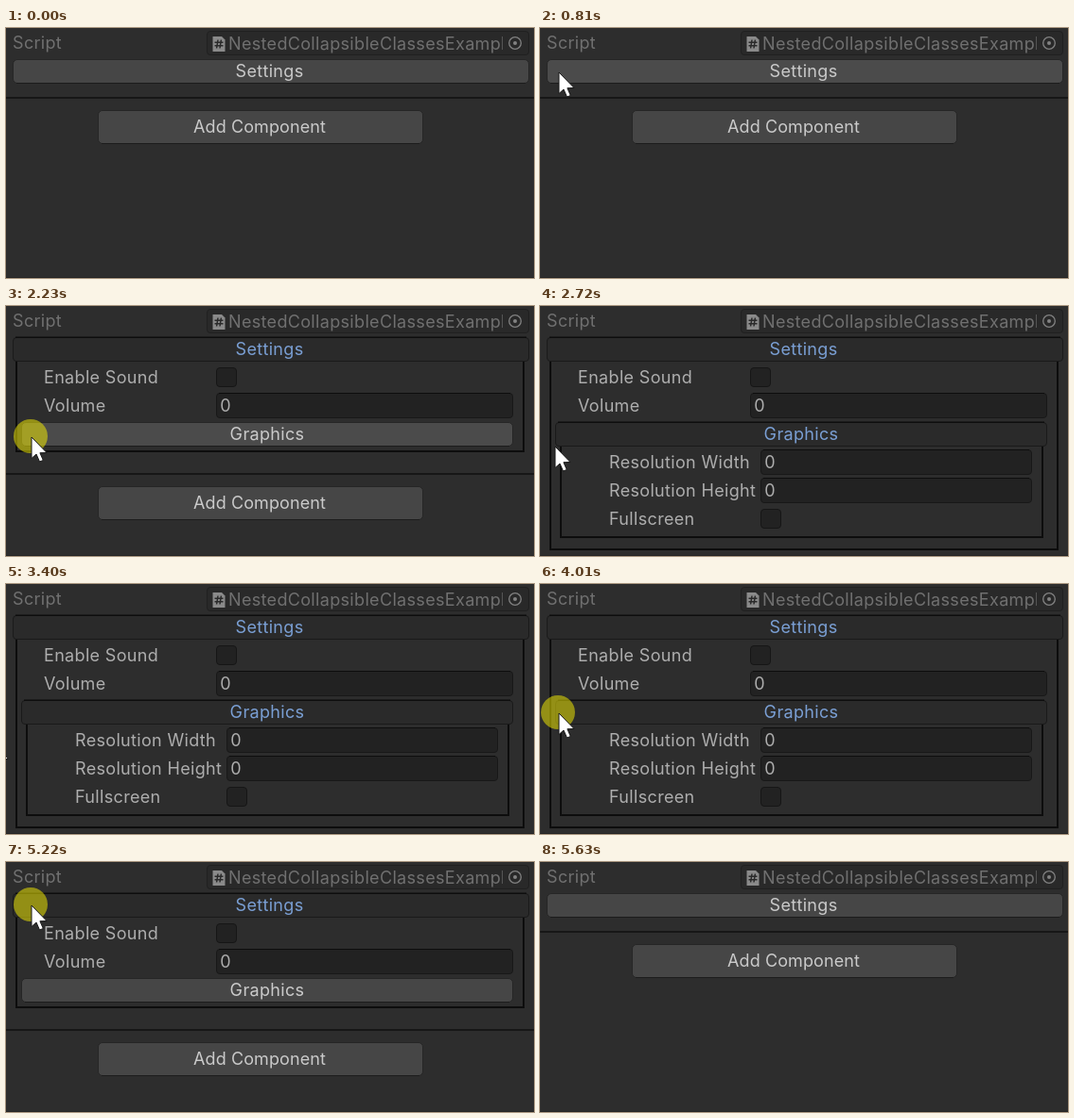
These frames come from a looping animation (558x265 px, 6.03 s). An HTML page with a canvas:

```html
<!DOCTYPE html>
<html lang="en">
<head>
<meta charset="utf-8">
<title>Nested collapsible inspector</title>
<style>
html, body { margin: 0; width: 100%; height: 100%; overflow: hidden; background: #2d2d2d; }
canvas { display: block; width: 558px; height: 265px; }
</style>
</head>
<body>
<canvas id="stage"></canvas>
<script>
const W = 558, H = 265, LOOP = 6030;
const canvas = document.getElementById('stage');
const ctx = canvas.getContext('2d');
const dpr = window.devicePixelRatio || 1;
canvas.width = W * dpr;
canvas.height = H * dpr;

const BG = '#2d2d2d', LINE = '#0d0d0d', LABEL = '#aeaeae', BRIGHT = '#cacaca';
const BLUE = '#7a9fd4', DIM = '#707070';
const TRACKING = 0.33;

const linear = t => t;
const easeOut = t => 1 - Math.pow(1 - t, 1.6);
const easeInOut = t => t * t * (3 - 2 * t);

// Pointer moves advance in discrete steps along quadratic curves.
const moves = [
  { at: 530, step: 70, n: 5, a: [-20, 84], c: [2, 62], b: [19, 46], ease: easeOut },
  { at: 1410, step: 70, n: 9, a: [19, 46], c: [-14, 90], b: [26, 138], ease: easeInOut },
  { at: 2720, step: 70, n: 5, a: [26, 138], c: [-1.5, 163], b: [-29, 188], ease: linear },
  { at: 3330, step: 80, n: 7, a: [-24, 176], c: [-2, 158], b: [19, 136], ease: easeOut },
  { at: 4280, step: 67.5, n: 9, a: [19, 136], c: [2, 92], b: [26, 45], ease: easeInOut },
  { at: 5490, step: 70, n: 3, a: [26, 45], c: [2, 64.5], b: [-22, 84], ease: linear }
];
const clicks = [[940, 1010], [2100, 2380], [4010, 4080], [5220, 5290]];

const within = (t, from, to) => t >= from && t < to;

function pointerAt(t) {
  const m = moves.filter(v => t >= v.at).pop();
  if (!m) return [-40, 80];
  const i = Math.min(m.n, Math.floor((t - m.at) / m.step + 0.001) + 1);
  const u = m.ease(i / m.n), v = 1 - u;
  return [0, 1].map(k => v * v * m.a[k] + 2 * u * v * m.c[k] + u * u * m.b[k]);
}

function text(str, x, y, color, align = 'left', tracking = TRACKING) {
  ctx.font = '18px Inter, "Open Sans", sans-serif';
  ctx.letterSpacing = tracking + 'px';
  ctx.textAlign = align;
  ctx.fillStyle = color;
  ctx.fillText(str, x, y);
}

function panel(x, y, w, h, fill, stroke, r = 3.5) {
  ctx.beginPath();
  ctx.roundRect(x + 0.5, y + 0.5, w - 1, h - 1, r);
  ctx.fillStyle = fill;
  ctx.fill();
  ctx.strokeStyle = stroke;
  ctx.lineWidth = 1;
  ctx.stroke();
}

function button(str, x, y, w, h, cx, hover, tracking) {
  panel(x, y, w, h, hover ? '#4b4b4b' : '#464646', '#262626', 4.5);
  ctx.fillStyle = '#1c1c1c';
  ctx.fillRect(x + 4, y + h - 1, w - 8, 1);
  text(str, cx, y + h / 2 + 6.3, BRIGHT, 'center', tracking);
}

function foldout(str, x, y, w, cx, open, hover) {
  if (!open) return button(str, x, y, w, 26, cx, hover);
  panel(x, y, w, 26, '#2a2a2a', '#1a1a1a');
  ctx.fillStyle = LINE;
  ctx.fillRect(x + 3, y - 0.5, w - 6, 1.5);
  text(str, cx, y + 19.3, BLUE, 'center');
}

function field(x, y, w) {
  panel(x, y, w, 27, '#222222', '#181818');
  ctx.fillStyle = LINE;
  ctx.fillRect(x + 3, y, w - 6, 1);
  text('0', x + 4.2, y + 20, LABEL);
}

const checkbox = (x, y) => panel(x, y, 22, 21, '#222222', '#161616');

function frame(x, y, w, h) {
  ctx.strokeStyle = LINE;
  ctx.lineWidth = 2;
  ctx.strokeRect(x + 1, y + 1, w - 2, h - 2);
}

function scriptRow() {
  text('Script', 7, 22, DIM);
  panel(212, 3, 341, 26, '#292929', '#202020');

  ctx.fillStyle = '#8a8a8a';
  ctx.beginPath();
  ctx.moveTo(218.5, 9);
  ctx.lineTo(228, 9);
  ctx.lineTo(231.5, 12.5);
  ctx.lineTo(231.5, 25);
  ctx.lineTo(218.5, 25);
  ctx.fill();
  ctx.strokeStyle = '#2a2a2a';
  ctx.lineWidth = 1.5;
  ctx.beginPath();
  for (const d of [0, 3.4]) {
    ctx.moveTo(224 + d, 12.5);
    ctx.lineTo(222.6 + d, 21.5);
    ctx.moveTo(220.5, 15.3 + d);
    ctx.lineTo(229.5, 15.3 + d);
  }
  ctx.stroke();

  ctx.save();
  ctx.beginPath();
  ctx.rect(233, 4, 292, 24);
  ctx.clip();
  text('NestedCollapsibleClassesExample', 235, 22.5, DIM);
  ctx.restore();

  ctx.strokeStyle = ctx.fillStyle = '#828282';
  ctx.lineWidth = 1.3;
  ctx.beginPath();
  ctx.arc(538, 16, 6.3, 0, Math.PI * 2);
  ctx.stroke();
  ctx.beginPath();
  ctx.arc(538, 16, 2, 0, Math.PI * 2);
  ctx.fill();
}

function settingsBody(open, hover) {
  frame(10, 57, 538, open ? 202 : 98);
  text('Enable Sound', 40, 82, LABEL);
  checkbox(222, 65);
  text('Volume', 40, 112, LABEL);
  field(222, 92, 314);
  if (open) graphicsBody();
  foldout('Graphics', 16, 123, 520, 276, open, hover);
}

function graphicsBody() {
  frame(21, 147, 511, 99);
  text('Resolution Width', 73, 172, LABEL);
  field(233, 152, 287);
  text('Resolution Height', 73, 202, LABEL);
  field(233, 182, 287);
  text('Fullscreen', 73, 232, LABEL);
  checkbox(233, 215);
}

function footer(dy) {
  ctx.fillStyle = '#171717';
  ctx.fillRect(0, 73 + dy, W, 2);
  button('Add Component', 97, 87 + dy, 344, 36, 268, false, 0.1);
}

function pointer(x, y, pressed) {
  if (pressed) {
    ctx.fillStyle = 'rgba(252, 244, 0, 0.5)';
    ctx.beginPath();
    ctx.arc(x, y, 18, 0, Math.PI * 2);
    ctx.fill();
  }
  const shape = [[1, 1], [1, 23.5], [6, 19], [9.5, 27], [13.3, 25.5], [9.9, 17.7], [17, 17.5]];
  ctx.beginPath();
  shape.forEach(([dx, dy]) => ctx.lineTo(x + dx, y + dy));
  ctx.closePath();
  ctx.fillStyle = '#ffffff';
  ctx.fill();
  ctx.strokeStyle = '#1a1a1a';
  ctx.lineWidth = 1;
  ctx.stroke();
}

function draw(t) {
  const [x, y] = pointerAt(t);
  const pressed = clicks.some(([from, to]) => within(t, from, to));
  const settingsOpen = within(t, 1010, 5290);
  const graphicsOpen = within(t, 2380, 4080);
  const overSettings = x >= 7 && y >= 33 && y < 59;
  const overGraphics = x >= 16 && y >= 123 && y < 149 && t >= 2100;

  ctx.setTransform(dpr, 0, 0, dpr, 0, 0);
  ctx.fillStyle = BG;
  ctx.fillRect(0, 0, W, H);
  footer(settingsOpen ? (graphicsOpen ? 208 : 104) : 0);
  ctx.fillStyle = '#262626';
  ctx.fillRect(0, H - 1, W, 1);
  scriptRow();
  if (settingsOpen) settingsBody(graphicsOpen, overGraphics);
  foldout('Settings', 7, 33, 546, 278.5, settingsOpen, overSettings);
  pointer(x, y, pressed);
}

const start = performance.now();
function tick() {
  draw((performance.now() - start) % LOOP);
  requestAnimationFrame(tick);
}
tick();
</script>
</body>
</html>
```
